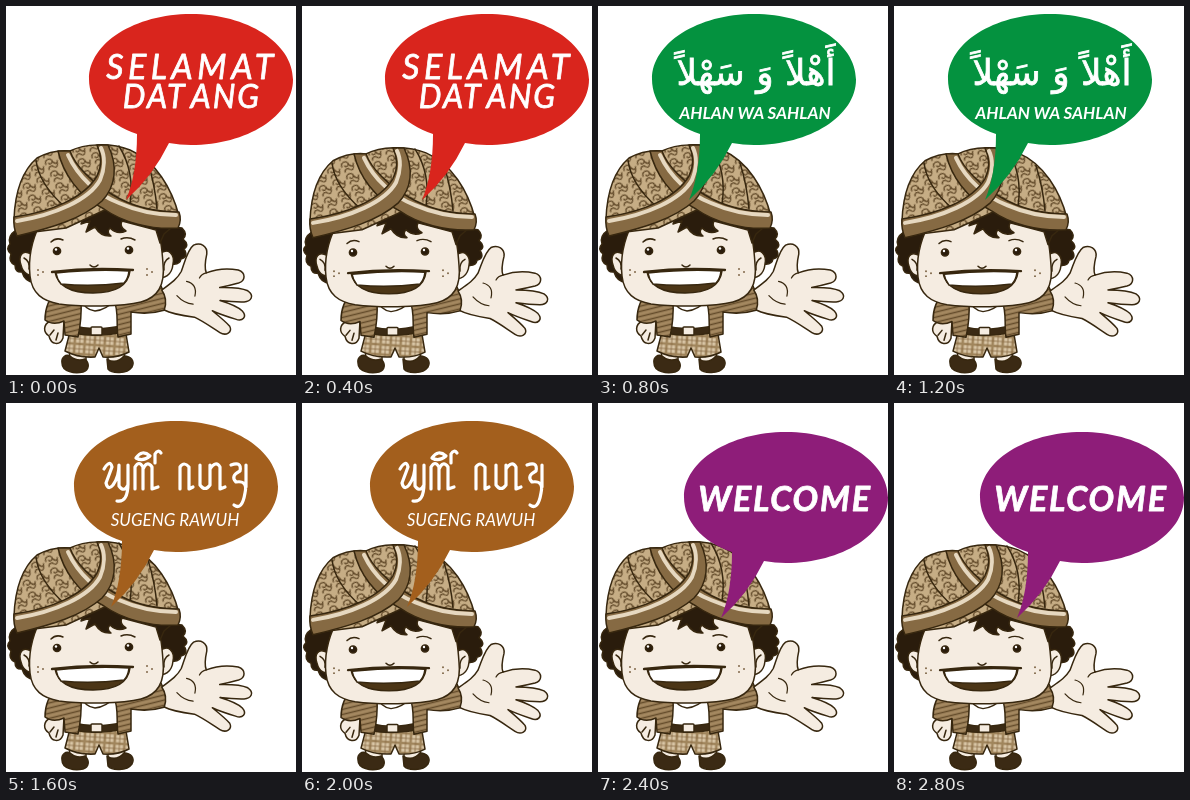
An HTML page that plays this animation: 290x369 px, repeating every 3.2 s.

```html
<!DOCTYPE html>
<html lang="id">
<head>
<meta charset="utf-8">
<title>Selamat datang</title>
<style>
  html, body { margin: 0; width: 100%; height: 100%; overflow: hidden; background: #fff; }
  svg { display: block; width: 290px; height: 369px; }
  .ink { stroke: #37270f; stroke-width: 1.5; stroke-linejoin: round; stroke-linecap: round; }
  .line { fill: none; }
  .skin { fill: #f5ece1; }
  .hair { fill: #2a1c0c; }
  .shoe { fill: #3b2a14; }
  .band { fill: #866a43; }
  .shine { fill: none; stroke: #e6d8c0; stroke-width: 4; stroke-linecap: round; }
  .greeting { display: none; fill: #fff; text-anchor: middle; font: italic 34px Lato, sans-serif; }
  .round { stroke: #fff; stroke-width: .8; stroke-linejoin: round; }
  .small { font-size: 17px; }
  .arabic { font: 36px "DejaVu Sans", sans-serif; stroke: #fff; stroke-width: .8; }
  .script { fill: none; stroke: #fff; stroke-width: 3.2; stroke-linecap: round; stroke-linejoin: round; }
</style>
</head>
<body>
<svg viewBox="0 0 290 369">
  <defs>
    <pattern id="batik" width="15" height="13" patternUnits="userSpaceOnUse" patternTransform="rotate(-24)">
      <rect width="15" height="13" fill="#c6ad85"/>
      <path d="M2 5c0-5 7-5 7-1c0 3-4 3-4 1M9 4c1 5 4 5 5 2M3 11c0-3 5-3 5-1M8 10c2 3 5 1 5-2"
            fill="none" stroke="#5f4727" stroke-width="1.3" stroke-linecap="round"/>
    </pattern>
    <pattern id="stripes" width="7" height="5" patternUnits="userSpaceOnUse" patternTransform="rotate(-14)">
      <rect width="7" height="5" fill="#a48860"/>
      <path d="M0 1.5H7" stroke="#634b2a" stroke-width="1.5"/>
    </pattern>
    <pattern id="plaid" width="10" height="10" patternUnits="userSpaceOnUse" patternTransform="rotate(4)">
      <rect width="10" height="10" fill="#d9c6a6"/>
      <path d="M0 2H10M2 0V10" stroke="#a0855c" stroke-width="2.6"/>
      <path d="M0 7H10M7 0V10" stroke="#866a43" stroke-width=".8"/>
    </pattern>
  </defs>

  <!-- feet stay planted -->
  <g class="ink">
    <path class="skin" d="M64 342L63 356L80 357L80 344ZM102 345L102 358L119 357L118 342Z"/>
    <path class="shoe" d="M56 357C55 351 60 348 64 350Q71 356 79 353C84 358 83 364 77 366C69 368 56 366 56 357ZM101 353Q110 359 118 350C125 350 129 355 126 361C121 368 106 368 102 363Z"/>
  </g>

  <g id="figure">
    <!-- body -->
    <g class="ink">
      <path class="skin" d="M44 315C37 319 37 326 43 330C45 339 54 340 57 332L58 314Z"/>
      <path class="line" d="M44 329L48 324M50 334L52 327"/>
      <path fill="#fff" d="M73 291L113 291L112 329L73 329Z"/>
      <path fill="url(#plaid)" d="M65 322Q90 331 119 322L123 346Q112 352 97 351L93 342L89 351Q72 352 59 345Z"/>
      <path class="shoe" d="M68 320Q91 326 118 319V326Q92 332 67 327Z"/>
      <rect x="85" y="321" width="11" height="8" rx="1" fill="#f5ece1"/>
      <path fill="url(#stripes)" d="M51 285C42 293 39 304 39 314Q47 320 58 315L59 329L72 331Q76 313 75 293Z"/>
      <path fill="url(#stripes)" d="M108 295C113 304 110 319 112 331L125 328L125 306Q143 309 159 304Q162 293 155 280C139 285 124 289 108 295Z"/>
      <path class="line" d="M74 292Q79 304 89 305Q100 304 109 294"/>
    </g>

    <g id="hand" class="ink">
      <path class="skin" d="M156 284C166 277 172 273 176 266C180 256 183 244 189 240C196 237 203 241 202 249C200 257 199 263 201 268C212 264 224 264 233 266C241 269 240 277 233 279C225 281 220 282 214 283C224 283 236 284 242 287C249 292 245 298 238 298C230 298 221 297 214 296C223 299 232 303 236 307C241 313 236 318 229 315C220 312 212 309 206 306C213 312 220 318 223 322C226 328 219 332 213 328C204 322 196 316 188 312C176 310 165 308 158 304Q162 293 156 284Z"/>
      <path class="line" stroke-width="1.2" d="M181 276Q192 279 189 291M201 268Q196 269 194 273M171 290Q178 298 187 299"/>
    </g>

    <!-- head -->
    <g class="ink">
      <path class="hair" d="M10 224Q1 230 4 238Q-1 243 5 248Q2 256 9 259Q9 267 16 266Q19 276 28 276L42 222ZM148 219L176 222Q182 228 177 233Q184 239 178 243Q183 251 175 253Q174 259 166 258L152 260Z"/>
      <path class="skin" d="M25 248C16 243 12 250 15 259C17 268 24 271 29 267ZM154 248C162 241 169 248 167 258C166 269 158 274 151 270Z"/>
      <path class="line" d="M18 252Q24 255 23 263M163 252Q157 255 158 264"/>
      <path class="skin" d="M34 218C26 234 22 251 24 270C26 288 37 295 53 298C76 301 116 301 135 296C154 291 159 277 157 258C156 243 155 232 149 215L90 200Z"/>
      <path class="hair" d="M79 207L75 218L84 215L80 226L89 221Q95 231 105 230Q100 226 104 222Q111 229 120 225Q113 221 116 215L150 224L154 237L158 228L165 222L110 202Z"/>
    </g>

    <!-- face -->
    <g class="ink">
      <path class="line" d="M45 236Q50 231 57 234M115 233Q122 230 129 234M84 259Q88 263 92 259"/>
      <circle class="hair" cx="51" cy="245" r="3.6"/>
      <circle class="hair" cx="123" cy="244" r="3.6"/>
      <path fill="#4c3617" d="M49 266C76 264 102 263 124 265C122 281 107 287 87 287C66 287 52 281 49 266Z"/>
      <path fill="#fff" d="M50 267Q89 263 123 265Q122 273 118 277Q86 281 55 278Q51 273 50 267Z"/>
      <path class="line" style="stroke-width:2.3" d="M46 266Q85 261 127 264"/>
    </g>
    <g fill="#fff"><circle cx="50" cy="243.5" r="1.2"/><circle cx="122" cy="242.5" r="1.2"/></g>
    <g fill="#80684a">
      <circle cx="32" cy="264" r="1"/><circle cx="37" cy="266" r="1"/><circle cx="32" cy="269" r="1"/>
      <circle cx="141" cy="263" r="1"/><circle cx="146" cy="266" r="1"/><circle cx="141" cy="269" r="1"/>
    </g>

    <!-- headcloth -->
    <g class="ink">
      <path fill="url(#batik)" d="M8 213C9 186 17 164 31 152C42 146 54 144 64 145C78 138 104 136 124 144C150 155 166 183 173 210L169 220C145 221 120 214 101 203L60 222L12 228Z"/>
      <path class="line" d="M30 154C32 171 43 187 59 201M142 157Q149 179 151 203M113 140Q129 166 124 198"/>
      <path class="band" d="M52 145C57 167 72 190 98 203C116 216 145 224 172 222Q176 214 173 206C148 206 125 200 107 189C87 177 69 160 64 145Z"/>
    </g>
    <path class="shine" d="M62 149C72 171 92 189 113 197C131 205 152 209 170 209"/>
    <path class="ink band" d="M8 211C45 206 78 192 91 170C96 160 96 150 91 139L102 139C112 160 110 180 96 195C76 213 45 222 11 230Q7 221 8 211Z"/>
    <path class="shine" d="M11 215C48 209 83 194 94 174C99 162 99 150 95 142"/>
  </g>

  <path id="bubble" d="M131 128C101 118 83 97 83 73C83 37 129 8 185 8S287 37 287 73.500S241 139 185 139Q174 139 163 137Q147 170 120 194Q131 168 131 128Z"/>

  <g class="greeting round">
    <text x="186" y="73" letter-spacing="4.500">SELAMAT</text>
    <text x="186" y="102" font-size="32" letter-spacing="2">DAT<tspan dx="6">ANG</tspan></text>
  </g>
  <g class="greeting">
    <text class="arabic" x="158" y="79" direction="rtl">أَهْلاً وَ سَهْلاً</text>
    <text class="small" x="157" y="113" font-weight="700">AHLAN WA SAHLAN</text>
  </g>
  <g class="greeting">
    <path class="script" d="M98 66Q104 56 106 64L100 80Q102 88 107 82Q113 74 113 62V83Q118 90 122 82V62M122 80Q122 100 111 98M129 86V64Q133 57 137 64V86M137 66Q141 57 146 64V86L152 84M130 55Q136 46 144 53Q137 59 130 55M149 60V51Q152 46 155 50M174 86V64Q178 58 183 64V86L187 84M194 62V82Q199 89 204 82V62M204 66Q210 57 214 64V86L219 84M225 62Q236 58 234 68Q224 73 230 79Q242 77 239 90Q236 108 228 102M240 62V84"/>
    <text class="small" x="169" y="123">SUGENG RAWUH</text>
  </g>
  <g class="greeting round">
    <text x="187" y="108" font-weight="700" letter-spacing="1.800">WELCOME</text>
  </g>
</svg>
<script>
  const STEP = 400;
  const bubbles = [
    { color: "#d9251d", x: 0, y: 0 },
    { color: "#04923f", x: -29, y: 0 },
    { color: "#a35f1d", x: -15, y: 10 },
    { color: "#8e1d79", x: 3, y: 21 }
  ];
  const figure = document.getElementById("figure");
  const hand = document.getElementById("hand");
  const bubble = document.getElementById("bubble");
  const greetings = document.querySelectorAll(".greeting");

  function draw(now) {
    const beat = Math.floor(now / STEP) % (bubbles.length * 2);
    const current = beat >> 1;
    const crouched = beat % 2 === 1;
    const { color, x, y } = bubbles[current];

    // the body dips towards the knees on every second beat
    figure.setAttribute("transform", crouched ? "translate(0 4.9) scale(1 .986)" : "");
    hand.setAttribute("transform", crouched ? "" : "rotate(-1.5 157 294)");
    bubble.setAttribute("transform", `translate(${x} ${y})`);
    bubble.setAttribute("fill", color);
    greetings.forEach((g, i) => { g.style.display = i === current ? "inline" : "none"; });
  }

  const start = performance.now();
  function tick() {
    draw(performance.now() - start);
    requestAnimationFrame(tick);
  }
  tick();
</script>
</body>
</html>
```
